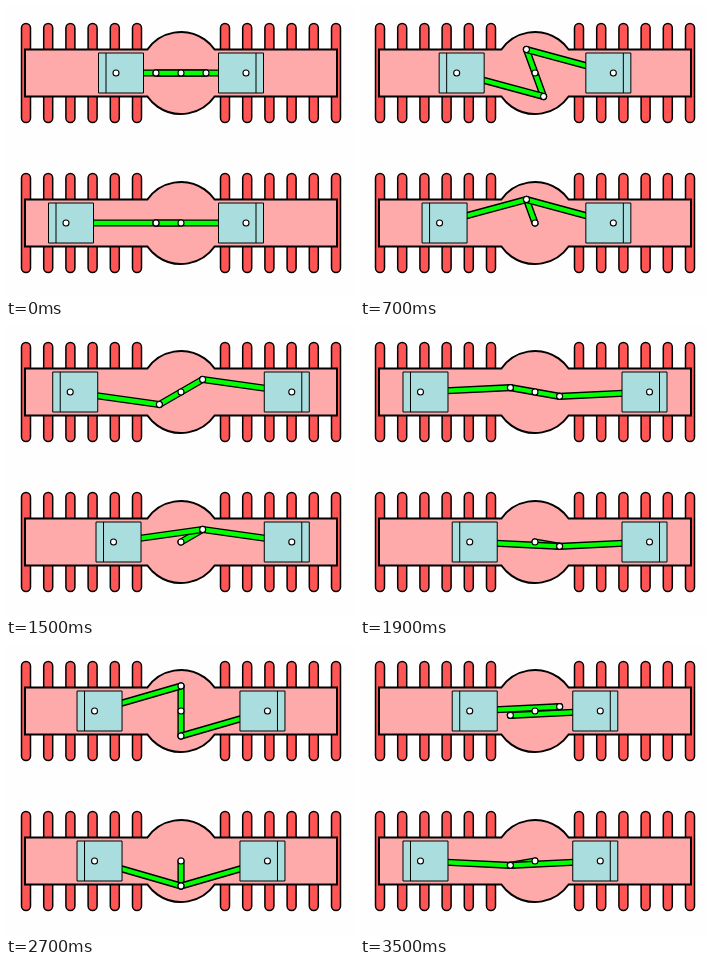
An HTML page with a canvas for the animation above (3.6 s loop, 348x291 px).

```html
<!DOCTYPE html>
<html lang="en">
<head>
<meta charset="utf-8">
<title>Opposed-piston engine layouts</title>
<style>
html, body { margin: 0; width: 100%; height: 100%; overflow: hidden; background: #fefefe; }
canvas { display: block; }
</style>
</head>
<body>
<canvas id="stage" width="348" height="291"></canvas>
<script>
const ctx = document.getElementById('stage').getContext('2d');
const CX = 175, CRANK = 25, ROD = 90;

function paint(fill, width) {
  ctx.fillStyle = fill;
  ctx.strokeStyle = '#000';
  ctx.lineWidth = width;
  ctx.fill();
  ctx.stroke();
}

function drawHousing(cy) {
  for (const start of [20, 219]) {
    for (let i = 0; i < 6; i++) {
      ctx.beginPath();
      ctx.roundRect(start + i * 22.2 - 4.5, cy - 49.5, 9, 99, 4.5);
      paint('#ff5555', 1.5);
    }
  }
  const half = 23.5, r = 41, a = Math.asin(half / r);
  ctx.beginPath();
  ctx.moveTo(19, cy - half);
  ctx.arc(CX, cy, r, Math.PI + a, -a);
  ctx.lineTo(331, cy - half);
  ctx.lineTo(331, cy + half);
  ctx.arc(CX, cy, r, a, Math.PI - a);
  ctx.lineTo(19, cy + half);
  ctx.closePath();
  paint('#ffaaaa', 2);
}

function drawBar(from, to) {
  ctx.lineCap = 'round';
  for (const [color, width] of [['#000', 7.2], ['#00ff00', 4.4]]) {
    ctx.strokeStyle = color;
    ctx.lineWidth = width;
    ctx.beginPath();
    ctx.moveTo(...from);
    ctx.lineTo(...to);
    ctx.stroke();
  }
}

// side is -1 for the left piston, 1 for the right one
function drawPiston([x, y], side) {
  ctx.lineCap = 'butt';
  ctx.beginPath();
  ctx.rect(x - (side < 0 ? 17.5 : 27.5), y - 20, 45, 40);
  ctx.moveTo(x + side * 10, y - 20);
  ctx.lineTo(x + side * 10, y + 20);
  paint('#aadddd', 1);
}

function drawPin([x, y]) {
  ctx.beginPath();
  ctx.arc(x, y, 3, 0, Math.PI * 2);
  paint('#fff', 1.1);
}

function drawEngine(cy, angle, opposed) {
  const dx = CRANK * Math.cos(angle), dy = CRANK * Math.sin(angle);
  const reach = Math.sqrt(ROD * ROD - dy * dy);
  const center = [CX, cy];
  const rightPin = [CX - dx, cy - dy];
  const leftPin = opposed ? [CX + dx, cy + dy] : rightPin;
  const left = [leftPin[0] - reach, cy];
  const right = [rightPin[0] + reach, cy];

  drawHousing(cy);
  drawBar(opposed ? leftPin : center, rightPin);
  drawBar(left, leftPin);
  drawBar(right, rightPin);
  drawPiston(left, -1);
  drawPiston(right, 1);
  [left, right, leftPin, rightPin, center].forEach(drawPin);
}

function frame() {
  const step = Math.floor(performance.now() / 100) % 36;
  const angle = step * Math.PI / 18;
  ctx.clearRect(0, 0, 348, 291);
  drawEngine(67, angle, true);
  drawEngine(217, angle, false);
  requestAnimationFrame(frame);
}
frame();
</script>
</body>
</html>
```
